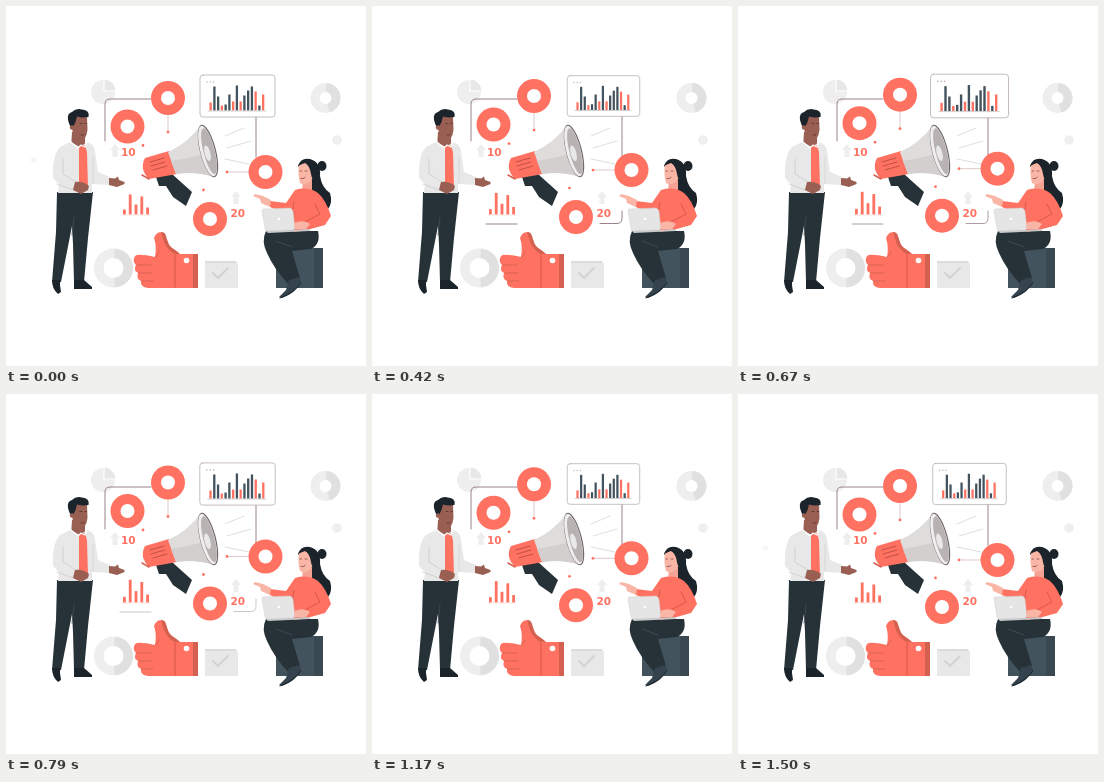
Animation, 360 px wide and 360 px high, one loop 1.54 s. Source, as an HTML page with a canvas:

```html
<!DOCTYPE html>
<html lang="en">
<head>
<meta charset="utf-8">
<title>Social campaign</title>
<style>
html, body { margin: 0; width: 100%; height: 100%; overflow: hidden; background: #fff; }
canvas { display: block; width: 360px; height: 360px; }
</style>
</head>
<body>
<canvas id="stage"></canvas>
<script>
const LOOP = 1540, STEPS = 37;
const CORAL = '#ff7262', DEEP = '#d4604f', DARK = '#263238', SLATE = '#43535d',
      PALE = '#efeeee', GREY = '#e0e0e0', LINE = '#8d7780', INK = '#1b242a',
      SKIN = '#9a5f53', BLUSH = '#f9b5a6';
const canvas = document.getElementById('stage');
const ctx = canvas.getContext('2d');
const ratio = window.devicePixelRatio || 1;
canvas.width = canvas.height = 360 * ratio;

function paint(d, fill, stroke, width = 1) {
  const p = new Path2D(d);
  if (fill) { ctx.fillStyle = fill; ctx.fill(p); }
  if (stroke) {
    ctx.strokeStyle = stroke;
    ctx.lineWidth = width;
    ctx.lineCap = ctx.lineJoin = 'round';
    ctx.stroke(p);
  }
}

function disc(x, y, r, fill, ry = r, turn = 0) {
  ctx.beginPath();
  ctx.ellipse(x, y, r, ry, turn, 0, 7);
  ctx.fillStyle = fill;
  ctx.fill();
}

function donut(x, y, r, hole, from, to) {
  disc(x, y, r, PALE);
  ctx.beginPath();
  ctx.moveTo(x, y);
  ctx.arc(x, y, r, from, to);
  ctx.fillStyle = GREY;
  ctx.fill();
  disc(x, y, hole, '#fff');
}

function bars(x, base, gap, width, heights, warm) {
  heights.forEach((h, i) => {
    ctx.fillStyle = warm.includes(i) ? CORAL : SLATE;
    ctx.fillRect(x + i * gap, base - h, width, h);
  });
}

// Eased interpolation through [time, value] pairs, wrapping at the loop end.
function track(t, keys) {
  const k = [...keys, [LOOP, keys[0][1]]];
  const i = Math.max(1, k.findIndex(p => p[0] > t));
  const [a, b] = [k[i - 1], k[i]];
  const e = (1 - Math.cos(Math.PI * (t - a[0]) / (b[0] - a[0]))) / 2;
  return a[1] + (b[1] - a[1]) * e;
}

function badge(x, y) {
  disc(x, y, 17, CORAL);
  disc(x, y, 7, '#fff');
}

function backdrop(t) {
  disc(97, 86, 12, PALE);
  paint('M98 85V73A12 12 0 0 1 110 85Z', '#e8e7e7', '#fff', 1.2);
  donut(319.5, 92, 15, 6, -1.5, 1.3);
  donut(107.5, 262, 19.5, 10, -1.5, 1.5);
  disc(331, 134, 4.8, '#efefef');
  ctx.globalAlpha = track(t, [[0, .5], [210, .8], [400, 0], [1300, 0]]);
  disc(27.5, 154, 2.8, '#eeeeee');
  ctx.globalAlpha = 1;
  paint('M199 255H230L232 258V282H199Z', '#e8e8e8');
  paint('M199 255H230V257H199Z', '#dcdcdc');
  paint('M207 267L212 272L222 262', null, '#d2d2d2', 1.8);
  for (const [x, y] of [[109, 138], [230, 185]])
    paint(`M${x} ${y}l5 6h-2.5v7h-5v-7h-2.5Z`, '#eeeeee');
}

function wires(t) {
  paint('M145 93H104Q99 93 99 98V135', null, LINE, .9);
  paint('M250 110V151', null, LINE, .9);
  ctx.globalAlpha = track(t, [[0, 0], [210, .2], [420, 1], [670, .8], [920, .1], [1170, 0]]);
  paint('M114 218H145M228 217.5H245Q250 217.5 250 212V205', null, LINE, .9);
  ctx.globalAlpha = 1;
  paint('M219 130L238 122M221 142L245 135M219 153L243 158', null, '#d6d6d6', .8);
}

function chartPanel(t) {
  const w = track(t, [[0, 75], [210, 78], [420, 72.5], [670, 78], [920, 72.5], [1170, 72.5], [1500, 73.5]]);
  ctx.save();
  ctx.translate(231, 90);
  ctx.scale(w / 75, w / 75);
  ctx.translate(-231, -90);
  paint('M197 69H266Q269 69 269 72V108Q269 111 266 111H197Q194 111 194 108V72Q194 69 197 69Z',
    '#fff', '#b9adb1', .8);
  for (let i = 0; i < 3; i++) disc(201 + i * 3.3, 76, .8, '#bbb');
  bars(203.5, 104.5, 3.75, 2.3,
    [8, 24, 14, 5, 6, 16, 9, 25, 9, 15, 20, 24, 19, 5, 16], [0, 3, 6, 8, 12, 14]);
  paint('M202 105H260', null, '#bdbdbd', .7);
  ctx.restore();
}

function megaphone() {
  paint('M150 171L166 168L186 186L180 200L167 191L160 180L153 180Z', DARK);
  paint('M139 152L163 145L171 168L143 173Q133 163 139 152Z', CORAL);
  paint('M162 146Q182 137 195 119L208 171Q190 165 170 168Z', '#dfdcdc');
  paint('M165 155Q188 151 201 147L208 171Q190 165 170 168Z', '#d3cfcf');
  ctx.save();
  ctx.translate(202, 145);
  ctx.rotate(-.25);
  disc(0, 0, 8, '#6e6668', 27);
  disc(-.4, 0, 7.2, '#efeded', 26);
  disc(.9, .4, 5.6, '#b9b2b2', 23.5);
  disc(-1, 2, 2.8, '#e9e9e9', 8);
  ctx.restore();
  paint('M144 156L158 152M145 160L159 156M147 164L161 160', null, '#b94c43', .9);
  paint('M136 169L143 173', null, DEEP, 1.5);
}

function thumb() {
  paint('M149 251Q151 241 148 232Q151 224 158 227Q162 235 163 240Q171 245 175 249H190V282H142Q134 281 135 275Q130 273 132 267Q127 264 130 259Q126 256 129 250Q132 247 149 251Z', CORAL);
  paint('M155 226Q159 226 160 230Q162 239 166 242Q171 245 175 249H170Q161 244 158 236Z', DEEP);
  paint('M169 248H192V282H169Z', CORAL);
  paint('M187 248H192V282H187Z', DEEP);
  paint('M169 249V281', null, '#c94c41', .8);
  paint('M131 259H145M133 267H146M136 275H147M149 251Q152 250 153 246', null, DEEP, .9);
  disc(180.5, 254.5, 2.8, '#fff');
}

function man() {
  paint('M51 186H87L82 232L78 276H68L67 238L66 220L55 276H46L50 226Z', DARK);
  paint('M68 211L66 229', null, '#465158', .7);
  paint('M46 274H54L54 279L55 286L52 288Q46 283 46 274Z', INK);
  paint('M68 274H78L86 281V283H68Z', INK);
  paint('M66 126H79V142H65Z', SKIN);
  paint('M66 112Q74 107 81 111L81.5 124Q80 135 74 134.5Q66 131 66 120Z', SKIN);
  paint('M62 114Q61 107 66 106Q70 102 76 103.5Q84 104 82.5 111Q76 112 71 110.5Q70 116 67.5 120L65 122Q63 118 62 114Z', INK);
  disc(66, 121.5, 2.2, SKIN);
  paint('M74 117.5h2M79 117.5h1.5M75 129q2 .8 3-.5', null, '#4a2d28', .7);
  paint('M64 136L74 141L81 136Q88 138 89 145L92 166L104 171V179L86 178V187H52L53 178L47 172Q46 149 54 141Z', PALE);
  paint('M64 136L74 141L81 136Q88 138 89 145L92 166L104 171V179L86 178V187H52L53 178L47 172Q46 149 54 141Z', 'rgba(0,0,0,.025)');
  paint('M73 141L79 139L81 146L82 181L77 185L73 180Z', CORAL);
  paint('M65 136L72 142L75 139L79 141L81 135', null, '#fff', 1.2);
  paint('M57 153L57 168L70 176L67 184L51 178', null, '#c9c6c6', .7);
  paint('M87 151L87 177', null, '#cfcfcf', .7);
  paint('M69 176Q77 175 83 180L82 184L75 188L67 184Z', SKIN);
  paint('M103 172L109 172.5L112 170.5L113 174L118.5 176V178L111 181L103 179Z', SKIN);
}

function woman() {
  paint('M270 242H317V282H270Z', SLATE);
  paint('M308 242H317V282H308Z', '#394851');
  disc(316, 160, 4.5, INK, 5);
  paint('M292 160Q295 151 304 153Q315 156 314 170Q316 182 324 187Q327 197 322 203Q313 196 306 187Q301 182 302 171Z', INK);
  paint('M260 225H312Q315 238 305 243L286 245L294 272L283 279Q268 263 261 247Q255 235 260 225Z', DARK);
  paint('M286 241L270 235', null, '#47545b', .7);
  paint('M283 274L293 271L295 276Q290 287 276 292L273 291L280 284Z', '#34434d');
  paint('M274 292Q288 287 295 277', null, INK, 1);
  paint('M297 174H306V186H296Z', '#f4a293');
  paint('M293 158Q299 154 306 160L307 172Q301 181 294 177Q291.5 169 293 158Z', BLUSH);
  paint('M292 160Q296 151 306 155Q313 160 311 177Q306 175 305 168Q304 160 299 157Q296 158 292 160Z', INK);
  paint('M294 165h1.5M299 165h2M295 172.5q2 1 4-1', null, '#733b38', .7);
  paint('M289 184Q302 180 312 187Q320 194 325 210L319 219L301 224L288 226L284 210L264 201L264 195L280 197Z', CORAL);
  paint('M309 198L314 208L299 216M288 196L286 209', null, '#cf5147', .8);
  paint('M265 194L257 190L249 188L247 190L254 193L255 197L264 201Z', BLUSH);
  paint('M257 203L284 202Q287 203 287 206L289 223L261 225Q259 225 259 222L256 205Z', '#e5e5e5', '#cecece', .5);
  disc(273, 213, 1.3, '#fff');
  paint('M260 225L304 223V225L262 227Z', '#c9c9c9');
  paint('M288 217Q298 213 304 218L300 223H289Z', BLUSH);
}

function draw(t) {
  const lift = -1.75 * (1 - Math.cos(2 * Math.PI * t / LOOP));
  ctx.setTransform(ratio, 0, 0, ratio, 0, 0);
  ctx.fillStyle = '#fff';
  ctx.fillRect(0, 0, 360, 360);
  backdrop(t);
  wires(t);
  chartPanel(t);

  paint(`M162 ${109 + lift}V${125 + lift}M221 ${166 + lift}H243`, null, '#c9a6a5', .6);
  for (const [x, y] of [[162, 126], [137, 139.5], [221, 166], [197.5, 184]])
    disc(x, y + lift, 1.4, CORAL);

  badge(121.5, 120.5 + lift);
  badge(162, 92 + lift);
  badge(259.5, 166 + lift);
  badge(204, 213 + lift);

  const grow = 1 - lift * .04;
  bars(117, 208.5, 5.8, 2.8, [5, 20, 10, 18, 7].map(h => h * grow), [0, 1, 2, 3, 4]);
  paint('M116 209H144', null, '#f0c4bf', .5);
  ctx.fillStyle = CORAL;
  ctx.font = 'bold 10.5px "DejaVu Sans", sans-serif';
  ctx.textAlign = 'center';
  ctx.fillText('10', 122.3, 150);
  ctx.fillText('20', 231.8, 210.5);

  megaphone();
  thumb();
  man();
  woman();
}

function tick() {
  const step = Math.floor((performance.now() % LOOP) / LOOP * STEPS);
  draw(step * LOOP / STEPS);
  requestAnimationFrame(tick);
}
tick();
</script>
</body>
</html>
```
